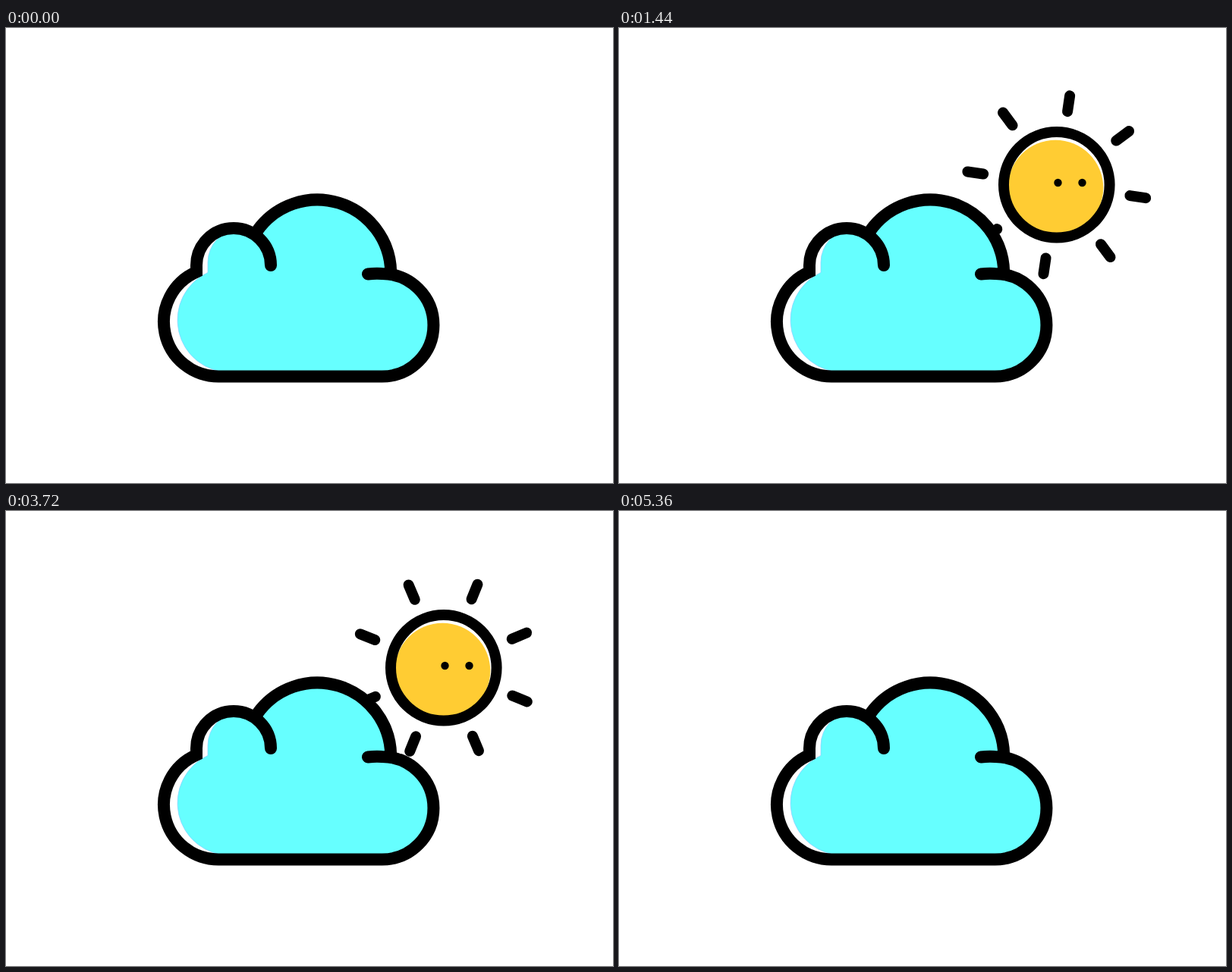
Write an HTML page that moves like this. It is 800 px wide and 600 px high and loops after 5.4 s.

```html
<!DOCTYPE html>
<html lang="en">
<head>
<meta charset="utf-8">
<title>Sun and cloud</title>
<style>
  html, body { margin: 0; width: 100%; height: 100%; overflow: hidden; background: #fff; }
  svg { display: block; width: 100%; height: 100%; }
</style>
</head>
<body>
<svg viewBox="0 0 800 600">
  <defs>
    <clipPath id="face"><circle r="66"/></clipPath>
  </defs>

  <g id="sun">
    <g id="rays" stroke="#000" stroke-width="14" stroke-linecap="round"></g>
    <circle r="70" fill="#fff"/>
    <g clip-path="url(#face)">
      <circle cx="-1.5" cy="4" r="63" fill="#fc3"/>
      <g id="eyes">
        <circle cx="1.7" cy="-2.8" r="5.2"/>
        <circle cx="33.7" cy="-2.8" r="5.2"/>
      </g>
    </g>
    <circle r="69.8" fill="none" stroke="#000" stroke-width="14"/>
  </g>

  <g id="cloud">
    <path fill="#fff" d="M280 459.5A72 72 0 0 1 251 321.6V313A49 49 0 0 1 331 275V268
      A97 97 0 0 1 506.5 324.8A68 68 0 0 1 496 459.5Z"/>
    <path fill="#6ff" stroke="#8cf" stroke-width=".7" d="M295 454A69 69 0 0 1 266 322.4V309
      A44 44 0 0 1 310 265L331 268A97 97 0 0 1 506.5 324.8A68 68 0 0 1 496 459.5Z"/>
    <g fill="none" stroke="#000" stroke-width="16" stroke-linecap="round">
      <path d="M349 313A49 49 0 0 0 251 313V321.6A72 72 0 0 0 280 459.5H495.7
        A67.75 67.75 0 0 0 495.7 324Q486 323.4 477 324.5"/>
      <path d="M330.8 267.8A97 97 0 0 1 507.2 321.6"/>
    </g>
  </g>
</svg>
<script>
const LOOP = 5400, STEP = 40;
const REST = { x: 576.8, y: 206.8 }, HIDDEN = { x: 400, y: 344 };
const $ = id => document.getElementById(id);
const sun = $('sun'), rays = $('rays'), eyes = $('eyes');

for (let i = 0; i < 8; i++) {
  const ray = document.createElementNS('http://www.w3.org/2000/svg', 'path');
  ray.setAttribute('d', 'M0-97.7V-118.7');
  ray.setAttribute('transform', `rotate(${i * 45})`);
  rays.append(ray);
}

const span = (t, a, b) => Math.min(1, Math.max(0, (t - a) / (b - a)));
const smooth = x => x * x * (3 - 2 * x);
const mix = (a, b, p) => a + (b - a) * p;

// 0 behind the cloud, 1 fully out
function rise(t) {
  const leave = span(t, 4600, 4840);
  return leave > 0 ? 1 - leave ** 2 : 1 - (1 - span(t, 40, 280)) ** 2;
}

// The eyes slide in from the left, rest, and slide out to the right
function eyeShift(t) {
  const start = t < 2600 ? 280 : 3400;
  const enter = smooth(span(t, start, start + 220));
  const exit = start === 280 ? smooth(span(t, 1760, 1960)) : 0;
  return mix(-112, 0, enter) + 76 * exit;
}

function draw(t) {
  const p = rise(t);
  sun.style.display = t >= 80 && t < 4840 ? '' : 'none';
  sun.setAttribute('transform',
    `translate(${mix(HIDDEN.x, REST.x, p)} ${mix(HIDDEN.y, REST.y, p)})`);
  rays.setAttribute('transform', `rotate(${0.006 * (t - 40)})`);
  eyes.setAttribute('transform', `translate(${eyeShift(t)} 0)`);
}

const origin = performance.now();
function tick() {
  const t = (performance.now() - origin) % LOOP;
  draw(Math.floor(t / STEP) * STEP);
  requestAnimationFrame(tick);
}
draw(0);
requestAnimationFrame(tick);
</script>
</body>
</html>
```
